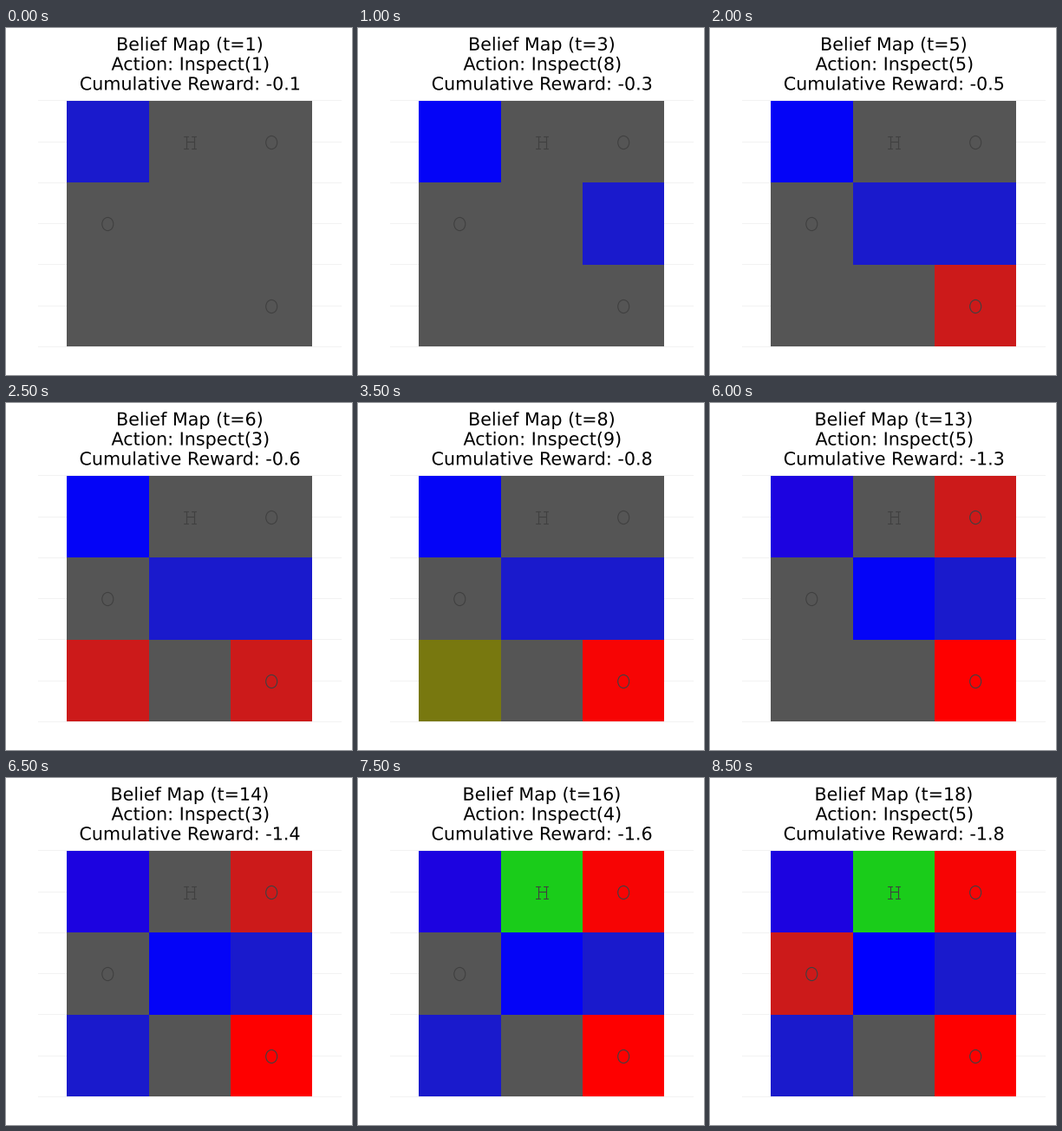
Write a matplotlib script that moves like this. It is 399 by 400 pixels and loops after 9000 ms.

```python
import numpy as np
import matplotlib.pyplot as plt
from matplotlib.animation import FuncAnimation
from matplotlib.patches import Ellipse, PathPatch, Rectangle
from matplotlib.textpath import TextPath
from matplotlib.transforms import Affine2D

W, H, DPI = 399, 400, 64
PX = 72 / DPI                      # one pixel in points
XS, YS = [70, 165, 259, 353], [84, 178, 273, 367]
GRID_ROWS = [83, 131, 178, 225, 272, 320, 367]
MID, SIZE = 212, 20.65
BASELINES = [25.8, 48.6, 71.4]
INK = "#404040"
RED, GREEN, BLUE = range(3)

# (inspected cell, observed class); cells count down the columns from 1
STEPS = [(1, BLUE), (1, BLUE), (8, BLUE), (9, RED), (5, BLUE), (3, RED),
         (3, GREEN), (9, RED), (7, RED), (9, RED), (1, RED), (3, BLUE),
         (5, BLUE), (3, BLUE), (7, RED), (4, GREEN), (2, RED), (5, BLUE)]


def beliefs():
    """Bayes update of every cell after each step."""
    b = np.full((9, 3), 1 / 3)
    history = []
    for cell, seen in STEPS:
        likelihood = np.full(3, 0.1)
        likelihood[seen] = 0.8
        b[cell - 1] *= likelihood
        b[cell - 1] /= b[cell - 1].sum()
        history.append(b.copy())
    return history


fig = plt.figure(figsize=(W / DPI, H / DPI), dpi=DPI, facecolor="white")
ax = fig.add_axes([0, 0, 1, 1])
ax.set_xlim(0, W)
ax.set_ylim(H, 0)
ax.axis("off")

for y in GRID_ROWS:
    ax.add_patch(Rectangle((37, y), 350, 1, fc="#f2f2f2", lw=0, aa=False))

cells = []
for k in range(9):
    col, row = divmod(k, 3)
    cells.append(ax.add_patch(Rectangle(
        (XS[col], YS[row]), XS[col + 1] - XS[col], YS[row + 1] - YS[row],
        lw=0, aa=False, zorder=2)))


def letter_o(x, y):
    ax.add_patch(Ellipse((x, y), 13, 15.2, fill=False, ec=INK,
                         lw=1.1 * PX, zorder=3))


def letter_h(x, y):
    strokes = [((-4.5, -4.5), (-7.2, 7.2)), ((4.5, 4.5), (-7.2, 7.2)),
               ((-4.5, 4.5), (-0.6, -0.6))]
    for side in (-1, 1):
        for end in (-7.2, 7.2):
            strokes.append(((side * 6.7, side * 2.2), (end, end)))
    for dx, dy in strokes:
        ax.plot(np.add(dx, x), np.add(dy, y), color=INK, lw=1.1 * PX,
                solid_capstyle="round", zorder=3)


letter_h(212, 132)
for x, y in [(306.2, 132), (117.3, 226), (306.2, 321)]:
    letter_o(x, y)


def line_path(text, base):
    """Outline of a text line, centred on its visible extent."""
    path = TextPath((0, 0), text, size=SIZE, prop={"family": "DejaVu Sans"})
    box = path.get_extents()
    shift = MID - (box.x0 + box.x1) / 2
    return path.transformed(Affine2D().scale(1, -1).translate(shift, base))


blank = TextPath((0, 0), "t", size=SIZE)
title = [ax.add_patch(PathPatch(blank, fc="black", lw=0, zorder=4))
         for _ in BASELINES]
history = beliefs()


def draw(i):
    t = i + 1
    lines = [f"Belief Map (t={t})",
             f"Action: Inspect({STEPS[i][0]})",
             f"Cumulative Reward: {-t / 10:.1f}"]
    for patch, text, base in zip(title, lines, BASELINES):
        patch.set_path(line_path(text, base))
    for cell, color in zip(cells, history[i]):
        cell.set_facecolor(np.clip(color, 0, 1))
    return cells + title


anim = FuncAnimation(fig, draw, frames=len(STEPS), interval=500,
                     repeat=True, repeat_delay=0)
plt.show()
```
